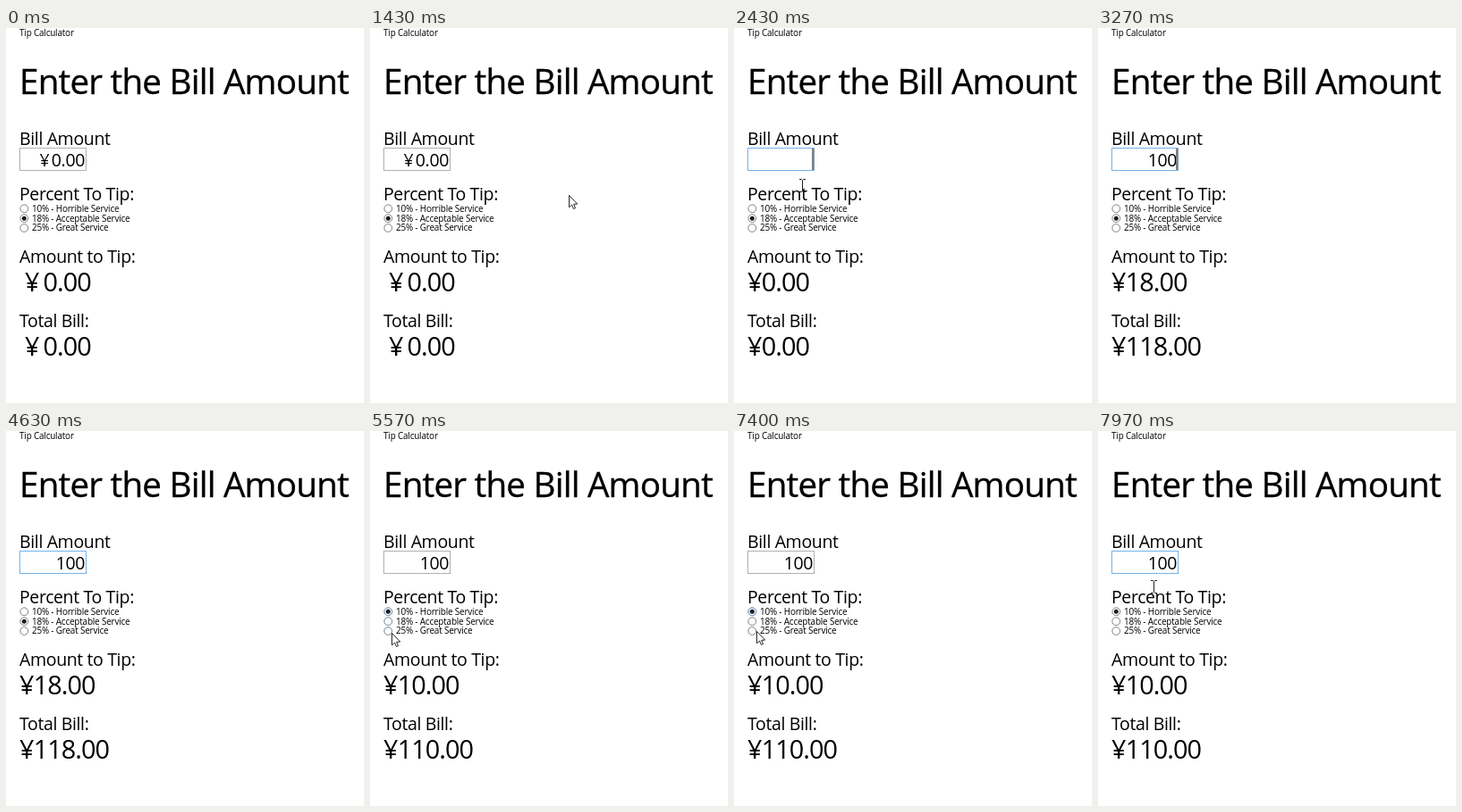
Animation of 400x420 px, one loop 8 s. Source, as an HTML page:

```html
<!DOCTYPE html>
<html lang="en">
<head>
<meta charset="utf-8">
<title>Tip Calculator</title>
<style>
  html, body { margin: 0; width: 100%; height: 100%; overflow: hidden; background: #fff; }
  svg { display: block; width: 400px; height: 420px; }
  text { font-family: "Open Sans", "Noto Sans", sans-serif; letter-spacing: -.019em; fill: #000; }
  .title { font-size: 38.5px; stroke: #000; stroke-width: .35px; }
  .label { font-size: 19.5px; }
  .small { font-size: 9.95px; }
  .money { font-size: 28.8px; letter-spacing: -.032em; }
</style>
</head>
<body>
<svg id="stage" viewBox="0 0 400 420"></svg>
<script>
const LOOP = 8000;
const stage = document.getElementById('stage');

function add(tag, attrs, content = '') {
  const node = document.createElementNS('http://www.w3.org/2000/svg', tag);
  set(node, attrs);
  node.textContent = content;
  return stage.appendChild(node);
}
function set(node, attrs) {
  for (const key in attrs) node.setAttribute(key, attrs[key]);
}
const write = (cls, x, y, content = '', more = {}) =>
  add('text', { class: cls, x, y, ...more }, content);

write('small', 15, 9, 'Tip Calculator');
write('title', 15, 74, 'Enter the Bill Amount');
write('label', 15, 131, 'Bill Amount');
write('label', 15, 193, 'Percent To Tip:');
write('label', 15, 263, 'Amount to Tip:');
write('label', 15, 335, 'Total Bill:');

const field = add('rect', { x: 15.5, y: 134.5, width: 74, height: 25, fill: '#fff' });
const fieldYen = write('label', 37.5, 154.5, '¥');
const fieldText = write('label', 88, 154.5, '', { 'text-anchor': 'end' });
const caret = add('rect', { x: 87, y: 135, width: 2.5, height: 24, fill: '#808080' });

const options = [
  [10, 'Horrible', 202.3], [18, 'Acceptable', 213.2], [25, 'Great', 224]
].map(([percent, word, y]) => {
  const ring = { cx: 20.3, cy: y, r: 4.4 };
  add('circle', { ...ring, fill: '#fff', stroke: '#777', 'stroke-width': .9 });
  const glow = add('circle', { ...ring, fill: '#e6f2fd', stroke: '#5a9bdc', 'stroke-width': .9 });
  const dot = add('circle', { ...ring, r: 2.5, fill: '#1c1c1c' });
  write('small', 29, Math.round(y + 3.4), `${percent}% - ${word} Service`);
  return { percent, y, glow, dot };
});

const money = y => ({ yen: write('money', 15, y, '¥'), digits: write('money', 31, y) });
const tip = money(294.7), total = money(366.7);

const arrow = add('path', {
  d: 'M0 0V13.3L3 10.6L5 15L7 14.1L5.1 9.8L9.2 9.6Z',
  fill: '#fff', stroke: '#111', 'stroke-width': .9
});
const beam = add('path', {
  d: 'M-3.5 -7H-1L0 -6L1 -7H3.5M0 -6V6M-3.5 7H-1L0 6L1 7H3.5',
  fill: 'none', stroke: '#222', 'stroke-width': 1
});

// time, bill (null = untouched), percent, field focused
const states = [
  [0, null, 18, false], [2200, '', 18, true], [2870, '1', 18, true],
  [3170, '10', 18, true], [3270, '100', 18, true], [5370, '100', 10, false],
  [6100, '100', 25, false], [7000, '100', 18, false], [7300, '100', 10, false],
  [7770, '100', 10, true]
];
const caretSteps = [
  [0, false], [2200, true], [3630, false], [4100, true], [4630, false],
  [4870, true], [5370, false]
];
// time, x, y, pointer shape until the next step
const pointerPath = [
  [0, 402, 316, ''], [1100, 396, 315, 'arrow'], [1250, 300, 248, 'arrow'],
  [1430, 222, 187, 'arrow'], [1600, 220, 179, 'arrow'], [1800, 220, 179, 'arrow'],
  [2060, 86, 152, 'beam'], [2200, 76, 148, 'beam'], [2260, 76, 150, 'beam'],
  [2430, 76, 176, 'beam'], [2870, 76, 176, ''], [4870, 75, 176, 'arrow'],
  [5150, 26, 198, 'arrow'], [5300, 20, 203, 'arrow'], [5420, 20, 203, 'arrow'],
  [5700, 27, 246, 'arrow'], [5870, 27, 246, 'arrow'], [6020, 22, 225, 'arrow'],
  [6140, 22, 225, 'arrow'], [6270, 27, 246, 'arrow'], [6800, 27, 246, 'arrow'],
  [6940, 21, 214, 'arrow'], [7030, 21, 213, 'arrow'], [7130, 21, 203, 'arrow'],
  [7310, 21, 203, 'arrow'], [7400, 25, 224, 'arrow'], [7470, 29, 226, 'arrow'],
  [7650, 55, 159, 'beam'], [7750, 64, 149, 'beam'], [7810, 64, 149, 'beam'],
  [7970, 62, 174, 'beam'], [LOOP, 62, 174, 'beam']
];

const stepAt = (table, t) => table.findLastIndex(row => row[0] <= t);

function pointerAt(t) {
  const i = stepAt(pointerPath, t);
  const [t0, x0, y0, shape] = pointerPath[i];
  const [t1, x1, y1] = pointerPath[i + 1];
  const k = (t - t0) / (t1 - t0);
  return { x: x0 + (x1 - x0) * k, y: y0 + (y1 - y0) * k, shape };
}

function isHovered(option, t) {
  const { x, y, shape } = pointerAt(Math.max(0, t));
  return shape === 'arrow' && x < 138 && Math.abs(y - option.y) < 5.4;
}

// Hover fades in and out: its share of the last 300 ms.
function glowAt(option, t) {
  const samples = 20;
  let hits = 0;
  for (let i = 0; i < samples; i++) hits += isHovered(option, t - i * 300 / samples);
  return hits / samples;
}

function showMoney({ yen, digits }, value, untouched) {
  set(yen, { x: untouched ? 21 : 15 });
  set(digits, { x: untouched ? 41.5 : 30.7 });
  digits.textContent = value.toFixed(2);
}

const show = (node, visible) => set(node, { visibility: visible ? 'visible' : 'hidden' });

function draw(t) {
  const [, bill, percent, focused] = states[stepAt(states, t)];
  const untouched = bill === null;
  set(field, { stroke: focused ? '#74b2ea' : '#b0b0b0' });
  show(fieldYen, untouched);
  fieldText.textContent = untouched ? '0.00' : bill;
  show(caret, caretSteps[stepAt(caretSteps, t)][1]);
  for (const option of options) {
    show(option.dot, option.percent === percent);
    set(option.glow, { opacity: glowAt(option, t) });
  }
  const extra = Number(bill) * percent / 100;
  showMoney(tip, extra, untouched);
  showMoney(total, Number(bill) + extra, untouched);

  const { x, y, shape } = pointerAt(t);
  const at = { transform: `translate(${Math.round(x) + .5} ${Math.round(y) + .5})` };
  set(arrow, at);
  set(beam, at);
  show(arrow, shape === 'arrow');
  show(beam, shape === 'beam');
}

const start = performance.now();
function tick() {
  draw((performance.now() - start) % LOOP);
  requestAnimationFrame(tick);
}
tick();
</script>
</body>
</html>
```
